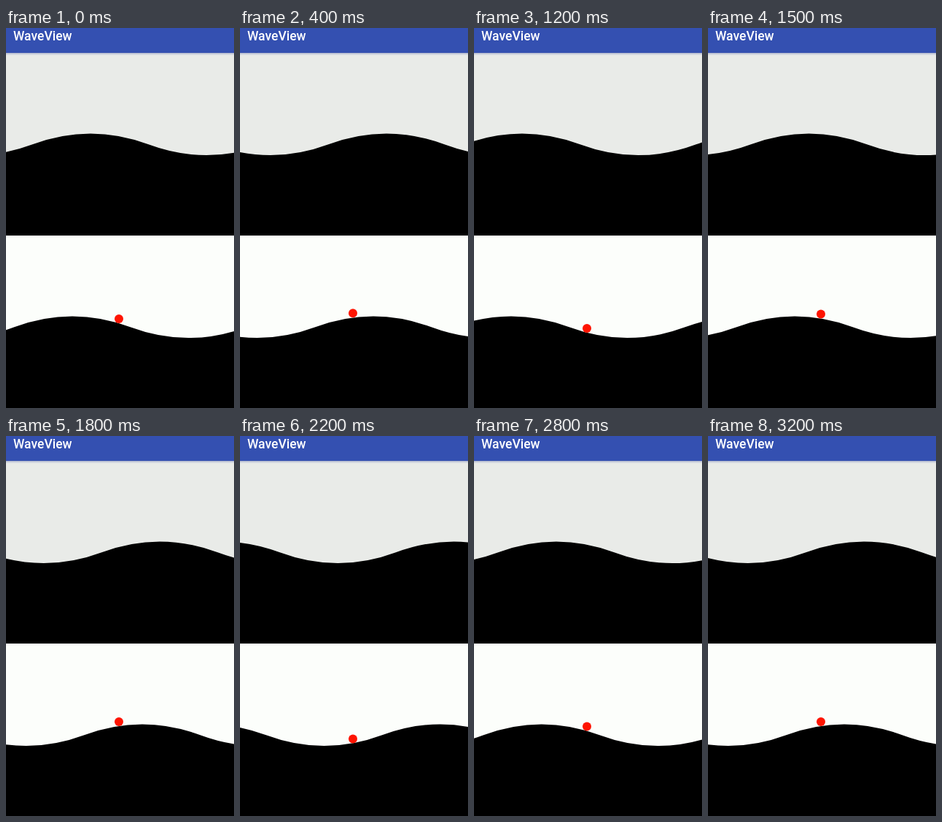
An HTML page for the animation above (3.3 s loop, 313x520 px).

```html
<!DOCTYPE html>
<html>
<head>
<meta charset="utf-8">
<style>
  html, body { margin: 0; width: 100%; height: 100%; overflow: hidden; background: #fcfefb; }
  svg { display: block; width: 313px; height: 520px; }
  text { font: 500 17.5px Roboto, sans-serif; fill: #fff; }
</style>
</head>
<body>
<svg viewBox="0 0 313 520">
  <rect y="34" width="313" height="250" fill="#e9ebe8"/>
  <rect y="34" width="313" height="1" fill="#aab1cb"/>
  <rect y="35" width="313" height="2" fill="#d3d7df"/>
  <rect width="313" height="34" fill="#3450b1"/>
  <text x="10" y="16.7">WaveView</text>
  <path id="upper"/>
  <path id="lower"/>
  <circle id="ball" cx="155" r="6" fill="#fe1400"/>
</svg>
<script>
const LOOP = 3300, STEP = 100;
const LENGTH = 318.5, HALF = LENGTH / 2, HEIGHT = 14.8;
const UPPER_Y = 159.3, LOWER_Y = 409.3;

// Distance travelled by one crest, sampled at these times
const times = [0, 400, 800, 1200, 1800, 2500, 3200];
const upperCrest = [116, 201, 290, 384.5, 529.5, 674, 851];
const lowerCrest = [91, 183, 275, 369.5, 505.5, 659, 824];

const el = id => document.getElementById(id);

function crestAt(keys, t) {
  let i = 0;
  while (i < times.length - 2 && t > times[i + 1]) i++;
  const p = (t - times[i]) / (times[i + 1] - times[i]);
  return keys[i] + (keys[i + 1] - keys[i]) * p;
}

function wavePath(crest, midY, bottom) {
  const start = crest % LENGTH - 1.25 * LENGTH;
  return `M${start} ${midY}q${HALF / 2} ${-2 * HEIGHT} ${HALF} 0` +
    `t${HALF} 0`.repeat(5) + `V${bottom}H${start}z`;
}

// The wave is a chain of parabolic arcs, alternately up and down
function waveY(x, crest, midY) {
  const u = (((x - crest) / HALF + 0.5) % 2 + 2) % 2;
  const d = 2 * (u % 1) - 1;
  return midY + (u < 1 ? -1 : 1) * HEIGHT * (1 - d * d);
}

function draw(now) {
  const t = Math.floor(now % LOOP / STEP) * STEP;
  const lower = crestAt(lowerCrest, t);
  el('upper').setAttribute('d', wavePath(crestAt(upperCrest, t), UPPER_Y, 284));
  el('lower').setAttribute('d', wavePath(lower, LOWER_Y, 520));
  el('ball').setAttribute('cy', waveY(155, lower, LOWER_Y) - 6);
}

let begin;
function tick(now) {
  begin ??= now;
  draw(now - begin);
  requestAnimationFrame(tick);
}
draw(0);
requestAnimationFrame(tick);
</script>
</body>
</html>
```
